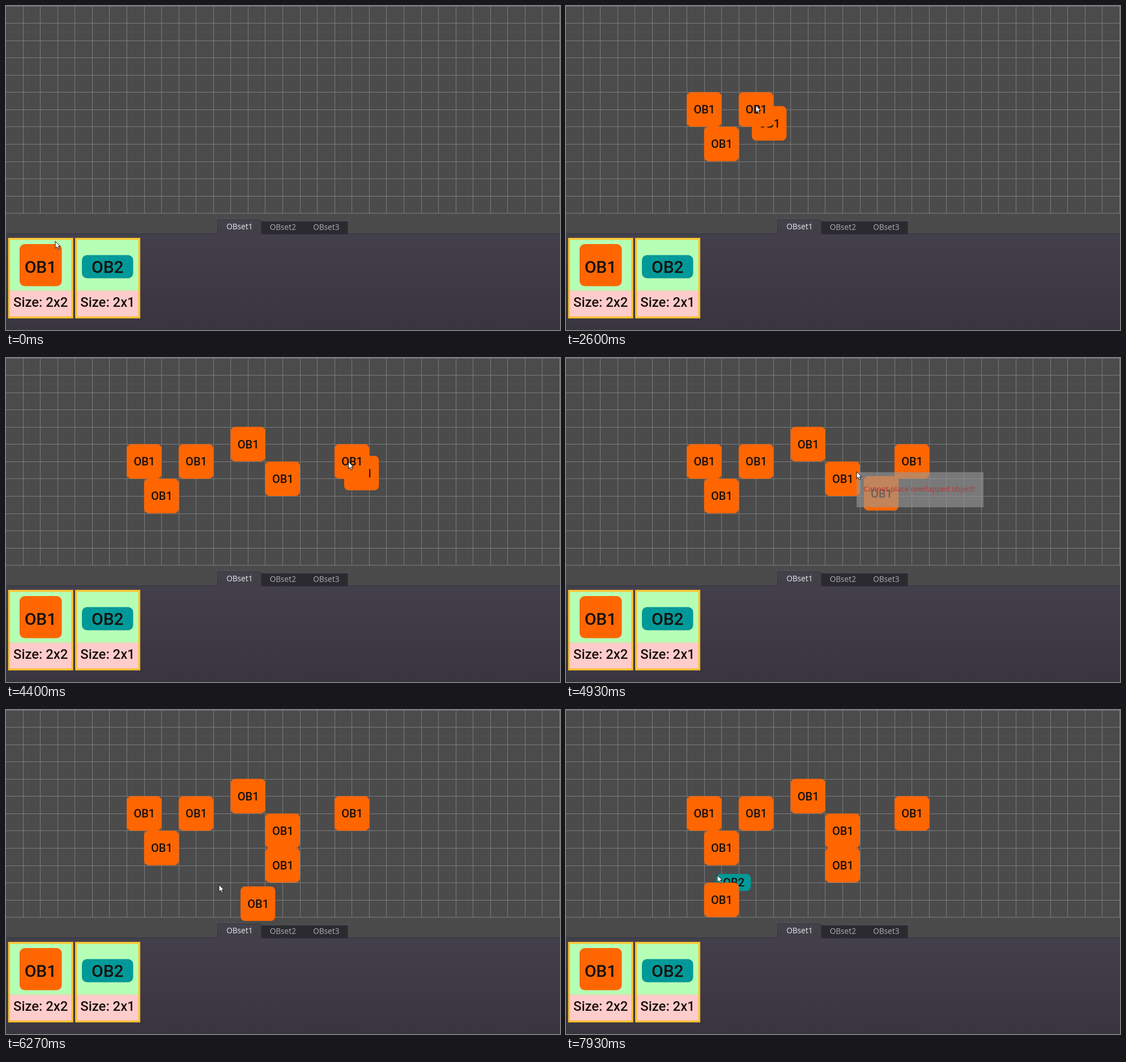
An HTML page with a canvas for the animation above (8000 ms loop, 978 by 573 pixels).

```html
<!DOCTYPE html>
<html lang="en">
<head>
<meta charset="utf-8">
<title>Grid placement</title>
<style>
html, body { margin: 0; width: 100%; height: 100%; overflow: hidden; background: #4b4b4b; }
canvas { display: block; }
</style>
</head>
<body>
<canvas id="stage" width="978" height="573"></canvas>
<script>
const ctx = document.getElementById('stage').getContext('2d');
const LOOP = 8000, FPS = 15, CELL = 978 / 32;
const ORANGE = '#ff6600', TEAL = '#009999', INK = '#18100c';
const LABEL = 'Roboto, "Noto Sans", sans-serif';
const UI = '"Noto Sans", "Open Sans", sans-serif';

// Key points of the pointer: step, x, y
const path = [
  [0, 87, 416], [2, 78, 441], [4, 78, 441], [10, 222, 166], [15, 326, 158], [19, 316, 159],
  [31, 264, 224], [38, 332, 181], [41, 341, 165], [45, 341, 165], [53, 408, 134],
  [59, 480, 196], [65, 601, 177], [67, 608, 190], [70, 580, 248], [74, 513, 201],
  [82, 462, 245], [85, 462, 245], [92, 460, 323], [94, 376, 309], [97, 245, 313],
  [104, 248, 309], [112, 179, 440], [115, 180, 440], [117, 279, 306], [118, 269, 294],
  [120, 265, 290]
];
const clicks = [10, 18, 31, 45, 53, 59, 65, 74, 85, 98];
const GRAB = 6, CANCEL = 105, GRAB_NEXT = 116, WARN_STEPS = 15;

function pointer(step) {
  const i = path.findIndex(key => key[0] >= step);
  if (i < 1) return path[0].slice(1);
  const [a, ax, ay] = path[i - 1], [b, bx, by] = path[i];
  const p = (step - a) / (b - a);
  return [ax + (bx - ax) * p, ay + (by - ay) * p];
}

// A click drops a 2x2 object into the cell under the pointer, or warns if it would overlap
const placed = [], warnings = [];
for (const step of clicks) {
  const [x, y] = pointer(step);
  const col = Math.floor(x / CELL), row = Math.floor(y / CELL);
  const hit = placed.some(o => Math.abs(o.col - col) < 2 && Math.abs(o.row - row) < 2);
  if (hit) warnings.push({ step, x, y });
  else placed.push({ step, col, row });
}

function rect(x, y, w, h, color) {
  ctx.fillStyle = color;
  ctx.fillRect(x, y, w, h);
}

function round(x, y, w, h, r, color) {
  ctx.fillStyle = color;
  ctx.beginPath();
  ctx.roundRect(x, y, w, h, r);
  ctx.fill();
}

function text(str, x, y, size, color, font = LABEL, weight = 500) {
  ctx.font = `${weight} ${size}px ${font}`;
  ctx.textAlign = 'center';
  ctx.fillStyle = color;
  ctx.fillText(str, x, y);
}

function block(x, y, label) {
  const h = label === 'OB1' ? 61 : 30;
  round(x, y, 61.3, h, 8, label === 'OB1' ? ORANGE : TEAL);
  text(label, x + 31.2, y + h / 2 + 7.3, 20, INK);
}

function gradient(y0, y1, from, to) {
  const g = ctx.createLinearGradient(0, y0, 0, y1);
  g.addColorStop(0, from);
  g.addColorStop(1, to);
  return g;
}

function grid() {
  rect(0, 0, 978, 573, '#4b4b4b');
  for (let i = 1; i <= 32; i++) rect(Math.floor(i * CELL - 0.5), 0, 1, 367, '#7b7b7b');
  for (let i = 0; i <= 12; i++) rect(0, Math.floor(i * CELL), 978, 1, '#7b7b7b');
}

function tabs() {
  rect(0, 402, 978, 171, gradient(403, 573, '#43404b', '#38353f'));
  rect(0, 402, 978, 1.5, '#393741');
  for (let i = 0; i < 3; i++) {
    const x = 374 + i * 76.5, on = i === 0;
    if (on) round(x - 1, 378, 79, 26, [2, 2, 0, 0], '#36343d');
    round(x, on ? 379 : 381, 76.5, on ? 25 : 22.5, [2, 2, 0, 0],
      on ? gradient(379, 404, '#45424d', '#413e48') : '#2b2a31');
    text('OBset' + (i + 1), x + 38.3, on ? 395 : 396, 13.6, on ? '#e0e0e0' : '#a6a6a8', UI, 400);
  }
}

function card(x, size) {
  rect(x, 410, 115, 142.5, '#ffc22f');
  rect(x + 3.5, 413.5, 108, 90, '#b6ffb6');
  rect(x + 3.5, 503.5, 108, 45.5, '#ffcccc');
  text('Size: ' + size, x + 57.5, 532, 23.8, INK);
}

function palette() {
  card(3.7, '2x2');
  round(24, 421, 74.5, 74.5, 9, ORANGE);
  text('OB1', 61, 471.5, 30, INK);
  card(122, '2x1');
  round(134, 440.5, 90.5, 41, 9, TEAL);
  text('OB2', 179.3, 471.5, 30, INK);
}

function warning(x, y) {
  rect(x, y, 224, 62, 'rgba(152,152,152,.6)');
  text('Cannot place overlapped object!', x + 110.5, y + 34, 13, '#b93636', UI, 400);
}

const arrow = new Path2D('M.5 .5V13L3.4 10.3 5.4 15 7.6 14 5.6 9.6H9.4Z');
function cursor(x, y) {
  ctx.save();
  ctx.translate(x - 0.5, y - 0.5);
  ctx.fillStyle = '#fff';
  ctx.strokeStyle = '#111';
  ctx.fill(arrow);
  ctx.stroke(arrow);
  ctx.restore();
}

function draw(ms) {
  const step = Math.floor((ms + 4) * FPS / 1000);
  const [gx, gy] = pointer(step - 1); // the dragged object trails one step
  grid();
  tabs();
  palette();
  if (step >= GRAB && step < CANCEL) block(gx - 4, gy - 4, 'OB1');
  if (step >= GRAB_NEXT) block(gx - 4, gy - 4, 'OB2');
  for (const o of placed)
    if (step >= o.step) block(o.col * CELL - 0.8, o.row * CELL - 0.4, 'OB1');
  for (const w of warnings)
    if (step >= w.step && step < w.step + WARN_STEPS) warning(w.x, w.y + 1);
  cursor(...pointer(step));
}

function frame() {
  draw(performance.now() % LOOP);
  requestAnimationFrame(frame);
}
frame();
</script>
</body>
</html>
```
